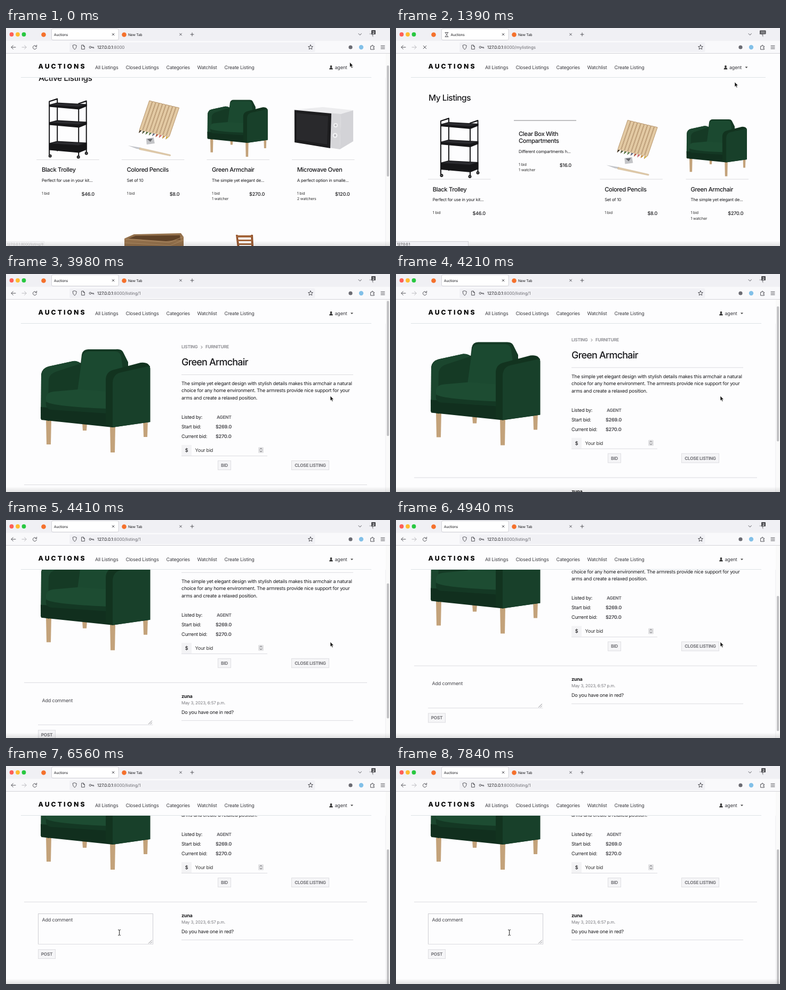
An HTML page for the animation above (8000 ms loop, 720 by 408 pixels).

```html
<!DOCTYPE html>
<html lang="en">
<head>
<meta charset="utf-8">
<title>Auctions</title>
<style>
  html, body { margin: 0; width: 100%; height: 100%; overflow: hidden; background: #fdfdfe; }
  svg { display: block; width: 720px; height: 408px; }
  text { font-family: Inter, Roboto, sans-serif; white-space: pre; text-rendering: geometricPrecision; }
  .line { fill: none; stroke: #55555b; stroke-width: 1; stroke-linecap: round; stroke-linejoin: round; }
</style>
</head>
<body>
<svg id="stage" viewBox="0 0 720 408"></svg>
<script>
const LOOP = 8000;

// ---- drawing helpers ----
// larger and bolder type is set tighter
const tracking = (size, w) => size > 17 ? -.044 : size > 10 || w > 600 ? -.034 : -.022;
const text = (x, y, size, str, { w = 400, c = '#18181b', end, mid, ls = tracking(size, w) } = {}) =>
  `<text x="${x}" y="${y}" font-size="${size}" font-weight="${w}" fill="${c}"` +
  (end || mid ? ` text-anchor="${end ? 'end' : 'middle'}"` : '') +
  ` style="letter-spacing:${ls}em">${str}</text>`;
const rect = (x, y, w, h, fill, extra = '') =>
  `<rect x="${x}" y="${y}" width="${w}" height="${h}" fill="${fill}" ${extra}/>`;
const path = (d, fill, extra = '') => `<path d="${d}" fill="${fill}" ${extra}/>`;
const icon = (d, color = '#55555b') => `<path class="line" d="${d}" style="stroke:${color}"/>`;
const dot = (x, y, r, fill) => `<circle cx="${x}" cy="${y}" r="${r}" fill="${fill}"/>`;
const rule = (x1, x2, y, c = '#dcdce0') => rect(x1, y, x2 - x1, 1, c);
const group = (id, body, x = 0, y = 0) =>
  `<g ${id ? `id="${id}"` : ''} transform="translate(${x} ${y})">${body}</g>`;
const button = (x, y, w, label) =>
  rect(x + .5, y + .5, w, 17, '#f5f5f7', 'stroke="#dedee2"') +
  text(x + w / 2 + .5, y + 12, 8.3, label, { w: 700, c: '#75757a', mid: true });

// ---- goods, each in a box of 118 by 118 ----
function trolley() {
  const shelf = (y, deep) =>
    path(`M26 ${y + 4}L41 ${y}L97 ${y + 3}V${y + 3 + deep}L82 ${y + 9 + deep}L26 ${y + 4 + deep}Z`, '#161618') +
    path(`M28 ${y + 4.5}L41 ${y + 1.5}L94 ${y + 4}L81 ${y + 8}Z`, '#2b2b2f');
  return group('', '<g fill="none" stroke="#161618" stroke-width="2" stroke-linejoin="round">' +
    '<path d="M26.5 109V9L41.5 4V102M81.5 113V13L96 8V106M26.5 9L41 4.5M81.5 13L96 8.5"/></g>' +
    shelf(11, 4) + shelf(44, 5) + shelf(83, 13) +
    [[28, 111], [81, 113], [96, 106]].map(([x, y]) => dot(x, y, 3, '#202022') + dot(x, y, 1.1, '#888')).join(''), -2.5, .5);
}

function pencils() {
  const tips = ['#222', '#2b4a3a', '#2f6a3a', '#3b7d4f', '#45639b', '#b5413a', '#d8577a', '#c98b35', '#d7b43a'];
  const wood = tips.map((c, i) => {
    const x = 52 + i * 6.3, y = 8 + i * 1.5, bx = x - 18, by = y + 53;
    return path(`M${x} ${y}L${x + 5.4} ${y + 1.4}L${bx + 5.2} ${by + 1.4}L${bx - 1.4} ${by + 7}L${bx} ${by}Z`,
        '#e3caa4', 'stroke="#a98254" stroke-width=".8"') +
      path(`M${bx + .2} ${by + 2.5}L${bx + 3.2} ${by + 3}L${bx - 1.9} ${by + 7.8}Z`, c);
  }).join('');
  return wood +
    path('M46 79L60 77L62 88L47 90Z', '#c3c4c7') + path('M48 80L58 79L54 85Z', '#67686c') +
    path('M12 92L36 96L35 99L28 98Z', '#c3c5ca') +
    path('M34 96L91 109Q93 110 91 111.500L33 99.500Z', '#dfc9a8', 'stroke="#c8b18c" stroke-width=".5"');
}

// drawn in the coordinates of the detail page
function armchair() {
  const leg = (x, y, w, h) => path(`M${x} ${y}h${w}l-1 ${h}h${2 - w}Z`, '#c3a27a');
  return leg(75, 258, 10, 48) + leg(143, 266, 9, 14) + leg(257, 258, 9, 34) + leg(195, 270, 10, 51) +
    path('M65 258L66 174Q68 163 80 160L126 150Q136 150 144 156V210L80 262Z', '#153a25') +
    path('M134 206L142 138Q144 128 154 128H206Q217 127 220 134L229 152V190L200 208Z', '#153a25') +
    path('M134 206L143 141Q145 133 155 132H205Q214 132 216 142L222 190L200 208Z', '#1b4930') +
    path('M66 180Q68 163 80 160L126 150Q135 149 139 155L96 169Q82 173 80 184L79 245L66 240Z', '#1b462e') +
    path('M65 236L190 244L200 274L66 260Z', '#112f1e') +
    path('M75 217Q77 208 90 207L136 203L190 207L196 246L150 245L82 237Q74 234 75 217Z', '#1d4c32') +
    path('M75 226Q90 235 188 239L190 248L84 241Q73 239 75 226Z', '#143824') +
    path('M187 184Q188 169 203 166L252 153Q269 151 270.500 164V264L200 274L187 269Z', '#12331f') +
    path('M200 274V190Q201 174 216 171L270 159V264Z', '#18402a');
}
const smallChair = () => `<g transform="translate(-34.8 -64) scale(.5515)">${armchair()}</g>`;

function microwave() {
  return path('M4 25L58 20L115 26L91 34L4 28Z', '#ececee') +
    path('M4 25L92 33L90 99L5 86Z', '#d6d6d9') +
    path('M5 25.500L74 32L72 97L5 86Z', '#1d1d1f') + path('M9 31L68 37L66 90L9 81Z', '#29292c') +
    path('M92 33L115 26V84L90 99Z', '#d3d3d7') +
    dot(82, 54, 4, '#f3f3f4') + dot(81, 73, 4.5, '#f3f3f4') + dot(82, 54, 2, '#bcbcc0') + dot(81, 73, 2.2, '#bcbcc0');
}

function clearBox() {
  const slots = [0, 1, 2, 3, 4].map(i => rect(51 + i * 10, 67 - i % 2, 8, 17, '#858384', 'stroke="#6d6c6d" stroke-width=".7"')).join('');
  return rect(0, 0, 117, 118, '#b4b2b3') +
    path('M2 45L42 27L114 35V72L86 88L2 83Z', '#9b999a', 'stroke="#737172"') +
    path('M2 45L42 27L114 35L84 52Z', '#a9a7a8', 'stroke="#737172"') +
    [0, 1, 2, 3].map(i => icon(`M${20 + i * 17} ${46 + i}L${48 + i * 16} ${29 + i * 2}v8`, '#7b797a')).join('') +
    slots + icon('M44 49V86M84 52V88', '#737172') +
    text(58.5, 62.5, 9, 'CLOSED', { w: 700, c: '#fff', mid: true });
}

// ---- cards ----
const goods = {
  trolley: { art: trolley, title: ['Black Trolley'], note: 'Perfect for use in your kit...', price: '$46.0' },
  pencils: { art: pencils, title: ['Colored Pencils'], note: 'Set of 10', price: '$8.0' },
  chair: { art: smallChair, title: ['Green Armchair'], note: 'The simple yet elegant de...', price: '$270.0', watch: '1 watcher' },
  oven: { art: microwave, title: ['Microwave Oven'], note: 'A perfect option in smalle...', price: '$120.0', watch: '2 watchers' },
  box: { art: clearBox, title: ['Clear Box With', 'Compartments'], note: 'Different compartments h...', price: '$16.0', watch: '1 watcher' }
};
function caption({ title, note, price, watch }, pad) {
  const dy = (title.length - 1) * 13.5;
  return title.map((s, i) => text(pad, 141.3 + i * 13.5, 11.25, s, { w: 500 })).join('') +
    text(pad, 159.5 + dy, 7.9, note) + text(pad, 183.7 + dy, 7.2, '1 bid', { c: '#333' }) +
    (watch ? text(pad, 194 + dy, 7.2, watch, { c: '#333' }) : '') +
    text(pad + 99, 185.7 + dy, 9, price, { w: 500, end: true });
}
const card = (name, x, y, pad) => {
  const g = goods[name], isBox = name === 'box';
  return group('', group(isBox ? 'boxArt' : '', g.art()) + (isBox ? '' : rule(0, 117.5, 118)) +
    group(isBox ? 'boxCaption' : '', caption(g, pad)), x, y);
};

// ---- pages ----
const home = text(61, 99, 15.5, 'Active Listings', { w: 500 }) +
  ['trolley', 'pencils', 'chair', 'oven'].map((n, i) => card(n, 57.2 + i * 159.6, 128, 9.7)).join('') +
  path('M222 394L240 386L328 384L333 391V408H222Z', '#94714c') + path('M230 394L243 389L326 388L327 396L300 399Z', '#5f4228') +
  icon('M223 395L306 401L332 391M223 402L308 407L332 397', '#b08d66') +
  path('M431 387h3.500l3 21h-4ZM459 387h4l1 21h-4Z', '#94542e') +
  path('M433 388h28v4h-28ZM434 396h28v3h-28ZM435 403h28v3h-28Z', '#a3653a');

const mine = text(61, 135.5, 15.5, 'My Listings', { w: 500 }) +
  rect(534, 155.5, 135.5, 237, 'none', 'id="frame" stroke="#dadade"') +
  rect(221, 172.5, 117, 1.2, '#98989c', 'id="alt"') +
  ['trolley', 'box', 'pencils', 'chair'].map((n, i) => card(n, 60 + i * 161.2, 164.5, 8.8)).join('');

const prose = ['The simple yet elegant design with stylish details makes this armchair a natural',
  'choice for any home environment. The armrests provide nice support for your',
  'arms and create a relaxed position.'];
const facts = [['Listed by:', 'AGENT', 395, '#66666b', 8.3], ['Start bid:', '$269.0', 393, '#55555a', 9], ['Current bid:', '$270.0', 393, '#55555a', 9]];
const listing = armchair() +
  text(329, 126.5, 8.2, 'LISTING', { w: 700, c: '#929297' }) + icon('M366 121.8l2 2.2l-2 2.2', '#77777c') +
  text(374, 126.5, 8.2, 'FURNITURE', { w: 700, c: '#929297' }) +
  text(329, 158, 18, 'Green Armchair', { w: 500 }) + rule(329, 651, 175) +
  prose.map((s, i) => text(329, 195 + i * 13.5, 9, s)).join('') +
  facts.map(([k, v, x, c, size], i) => text(329, 258 + i * 18, 9, k) + text(x, 258 + i * 18, size, v, { w: 700, c })).join('') +
  rect(329, 307, 19, 20, '#f3f3f5') + text(338.5, 320, 9, '$', { w: 500, mid: true }) +
  text(354.5, 320, 9, 'Your bid', { c: '#333' }) + rule(329, 490, 327) +
  rect(473, 311, 10, 11, '#e2e2e4', 'rx="1.5"') + icon('M476 315l2-2l2 2M476 318l2 2l2-2', '#66666b') +
  button(397, 336, 24, 'BID') + button(535, 336, 70, 'CLOSE LISTING') +
  rule(34, 677, 381) +
  text(329, 410, 9, 'zuna', { w: 700 }) + text(329, 422, 7.9, 'May 3, 2023, 6:57 p.m.', { c: '#77777c' }) +
  text(329, 440, 9, 'Do you have one in red?') + rule(329, 651, 452) +
  rect(60.5, 403.5, 215, 57, 'none', 'id="field" stroke="#cdcdd2"') +
  text(67.5, 418, 9, 'Add comment', { c: '#44444a' }) + rect(67.5, 408, 1, 12, '#222', 'id="caret"') +
  rule(60, 275.5, 460) + icon('M267.5 459l6-6M271 459l2.5-2.5', '#8a8a8f') +
  button(60, 470, 32, 'POST');

// ---- site header, menu, browser ----
const header = rect(0, 48, 712, 45, '#fdfdfe') +
  text(60.5, 76, 12.2, 'AUCTIONS', { w: 800, c: '#000', ls: .25 }) +
  [['All Listings', 167], ['Closed Listings', 224.5], ['Categories', 300.5], ['Watchlist', 358.5], ['Create Listing', 409.5]]
    .map(([s, x]) => text(x, 77.3, 9, s, { c: '#3c3c41' })).join('') +
  rect(28, 92, 657, 1, '#dde2e6', 'id="headline"') +
  group('user', dot(609.5, 72, 1.9, '#333') + path('M606.2 77.5q0-3.5 3.3-3.5t3.3 3.5Z', '#333') +
    text(616.5, 77.3, 9, 'agent', { c: '#3c3c41' }) + path('M646 72.5h5l-2.5 2.8Z', '#444'));

const menu = rect(581.5, 91.5, 113, 131, '#fff', 'stroke="#d6d6da" rx="2"') +
  rect(582, 96, 112, 23, '#f1f1f4') +
  ['My Listings', 'My Bids', 'Won Listings', 'Log Out'].map((s, i) => text(591, 111 + i * 32, 9, s)).join('') + rule(582, 694, 188);

const close = (x, y, r) => icon(`M${x - r} ${y - r}l${2 * r} ${2 * r}M${x + r} ${y - r}l${-2 * r} ${2 * r}`);
const browser = rect(0, 0, 720, 24, '#f0f0f4') + rect(0, 24, 720, 23.5, '#f9f9fb') + rect(0, 47, 720, 1, '#d4d4d8') +
  [['#fe5f57', 10.5], ['#febc2e', 22], ['#28c840', 33.5]].map(([c, x]) => dot(x, 12, 3.9, c)).join('') +
  dot(70.5, 12.5, 4.3, '#f5712c') + dot(221.5, 12.5, 4.3, '#f5712c') +
  rect(85.5, 1.5, 125.5, 21, '#fff', 'rx="2.5" stroke="#c9c9d0" stroke-width=".8"') +
  close(201, 12, 1.9) + close(327.5, 12, 1.9) + text(229, 14.7, 6.6, 'New Tab') +
  icon('M346 12h6M349 9v6M661 10.5l2.7 2.7l2.7-2.7') +
  group('tabName', text(90, 14.7, 6.6, 'Auctions')) +
  group('glass', icon('M92 8.5h6M92 16.5h6M93 8.5q0 2.5 2 4q2-1.5 2-4M93 16.5q0-2.5 2-4q2 1.5 2 4')) +
  icon('M18 36h-8M13.3 32.5l-3.5 3.5l3.5 3.5') + icon('M30 36h8M34.7 32.5l3.5 3.5l-3.5 3.5', '#b9b9be') +
  group('reload', icon('M57 34.5a3.5 3.5 0 1 0 .4 2.5M57.6 32v2.8h-2.8')) + group('stop', close(54, 36, 2.8)) +
  rect(119, 27, 460.5, 18, '#f1f1f5', 'rx="2.5"') +
  icon('M128.7 31.5l3.6 1.3q0 5.5-3.6 7.5q-3.6-2-3.6-7.5Z') +
  icon('M142 32h3l2.3 2.3v5.4h-5.3ZM145 32v2.5h2.3') +
  icon('M160 36h4.5v2M162.5 36v1.5') + '<circle class="line" cx="158" cy="36" r="1.9"/>' +
  text(171, 39, 8, '127.0.0.1<tspan id="address" fill="#6c6c72"></tspan>', { ls: -.014 }) +
  icon('M571 31.5l1.3 2.9l3.1.3l-2.4 2l.8 3.2l-2.8-1.7l-2.8 1.7l.8-3.2l-2.4-2l3.1-.3Z') +
  dot(646, 36, 3.6, '#6b6b72') + dot(666, 36, 4.2, '#82c0e8') +
  icon('M684 34h2q-.5-2 1-2t1 2h2.3v2.2q-1.8-.4-1.8 1t1.8 1v2h-6.3Z') +
  icon('M703 33.2h7M703 36h7M703 38.8h7') +
  icon('M682 11h4l2 5M688 10v4', '#88888d') +
  group('badge', rect(685, 4, 8, 8, '#4a4a4e', 'rx="1"') + text(689, 10.5, 6.5, '2', { w: 600, c: '#fff', mid: true })) +
  group('keys', rect(682, 4.5, 11.5, 7, '#4a4a4e', 'rx="1"') + icon('M684 7h7.5M684 9.2h7.5', '#c0c0c4'));

const status = rect(-.5, 399.5, 136, 9, '#f0f0f4', 'id="strip" stroke="#d0d0d5"') +
  text(2, 406.7, 6.7, '<tspan id="link"></tspan>', { c: '#333' });
const bar = rect(712, 48, 8, 360, '#fafafa') + rect(711.5, 48, .6, 360, '#e6e6e9') +
  rect(714, 0, 4.2, 253, '#c1c1c4', 'id="thumb" rx="2.1"');
const pointers = group('arrow', path('M0 0V9.3L2.1 7.4L3.6 10.8L5.2 10.1L3.7 6.8H6.5Z', '#111', 'stroke="#fff" stroke-width=".7"')) +
  group('hand', path('M0 .8Q1.2-.7 2.2 .8V4L5.8 5Q6.8 5.3 6.5 7L5.8 10.5H1.4L-1.6 6.5Q-1 5 0 6Z', '#fff', 'stroke="#222" stroke-width=".9"')) +
  group('beam', icon('M-2-5q2 0 2 1.5q0-1.5 2-1.5M0-3.5V4M-2 5.5q2 0 2-1.5q0 1.5 2 1.5', '#222'));

document.getElementById('stage').innerHTML =
  '<defs><linearGradient id="shade" x2="0" y2="1"><stop stop-opacity="0"/><stop offset="1" stop-opacity=".11"/></linearGradient></defs>' +
  rect(0, 0, 720, 408, '#fdfdfe') +
  group('home', home) + group('mine', mine) + group('listing', listing) +
  group('bar', bar) + header + rect(0, 398, 720, 10, 'url(#shade)') +
  group('menu', menu) + browser + group('status', status) + pointers;

// ---- motion ----
const $ = id => document.getElementById(id);
const show = (id, on) => { $(id).style.display = on ? '' : 'none'; };
const move = (id, x, y) => $(id).setAttribute('transform', `translate(${x} ${y})`);
const between = (t, a, b) => t >= a && t < b;
const ramp = (t, a, b) => Math.min(1, Math.max(0, (t - a) / (b - a)));
const smooth = u => u * u * (3 - 2 * u);

function track(keys, t) {
  let v = keys[0][1];
  for (let i = 1; i < keys.length; i++) v += (keys[i][1] - keys[i - 1][1]) * ramp(t, keys[i - 1][0], keys[i][0]);
  return v;
}
const scrollKeys = [[3980, 0], [4100, 2], [4210, 13], [4300, 48], [4410, 90], [4520, 111], [4640, 118], [4910, 118], [5040, 133], [5170, 140]];

// start, end, x, y, bend x, bend y
const strokes = [
  [20, 140, 643, 74], [370, 640, 635, 101], [1600, 2350, 610, 218],
  [3100, 3500, 608, 228], [5440, 5510, 609, 237], [5850, 6560, 212.5, 311.5, 440, 110]
];
function pointer(t) {
  let x = 644.5, y = 64;
  for (const [a, b, nx, ny, bx = (x + nx) / 2, by = (y + ny) / 2] of strokes) {
    if (t < a) break;
    const u = smooth(ramp(t, a, b)), v = 1 - u;
    x = v * v * x + 2 * u * v * bx + u * u * nx;
    y = v * v * y + 2 * u * v * by + u * u * ny;
  }
  return [x, y];
}

function render(t) {
  const page = t < 1100 ? 'home' : t < 3350 ? 'mine' : 'listing';
  const bars = page !== 'mine';
  for (const p of ['home', 'mine', 'listing']) show(p, p === page);

  const busy = between(t, 780, 1580) || between(t, 3040, 3570);
  show('glass', busy); show('stop', busy); show('reload', !busy);
  move('tabName', busy ? 12.5 : 0, 0);
  $('address').textContent = ':8000' + { home: '', mine: '/mylistings', listing: '/listing/1' }[page];

  show('bar', bars);
  $('headline').setAttribute('width', bars ? 657 : 665);
  move('user', bars ? 0 : 8.5, 0);
  show('menu', between(t, 450, 1100));
  const wide = between(t, 900, 1900) || between(t, 3150, 3500);
  show('keys', wide); show('badge', !wide);

  const boxed = t >= 1480;
  show('boxArt', boxed); show('alt', !boxed);
  move('boxCaption', 0, boxed ? 0 : -104);
  $('frame').style.opacity = ramp(t, 1950, 2150);

  const scroll = track(scrollKeys, t);
  move('listing', 0, 13 - scroll);
  $('thumb').setAttribute('y', page === 'home' ? 70 : 50.3 + scroll * .755);
  $('thumb').setAttribute('height', page === 'home' ? 208 : 253);

  const waiting = between(t, 850, 1650), hovering = between(t, 2000, 3350);
  show('status', t < 140 || waiting || hovering);
  $('status').style.opacity = t < 140 ? .3 * (1 - ramp(t, 0, 140)) : 1;
  $('link').textContent = '127.0.0.1' + (waiting ? '' : t < 140 ? ':8000/listing/8' : ':8000/listing/1');
  $('strip').setAttribute('width', waiting ? 136 : 72);

  $('field').style.opacity = ramp(t, 6380, 6560);
  show('caret', between(t, 7270, 7840));

  const [x, y] = pointer(t);
  const kind = between(t, 560, 1100) || between(t, 1950, 3740) ? 'hand'
    : x < 276 && y > 270 ? 'beam' : 'arrow';
  for (const k of ['arrow', 'hand', 'beam']) show(k, k === kind);
  move(kind, x, y);
}

const begin = performance.now();
function tick() {
  render((performance.now() - begin) % LOOP);
  requestAnimationFrame(tick);
}
tick();
</script>
</body>
</html>
```
